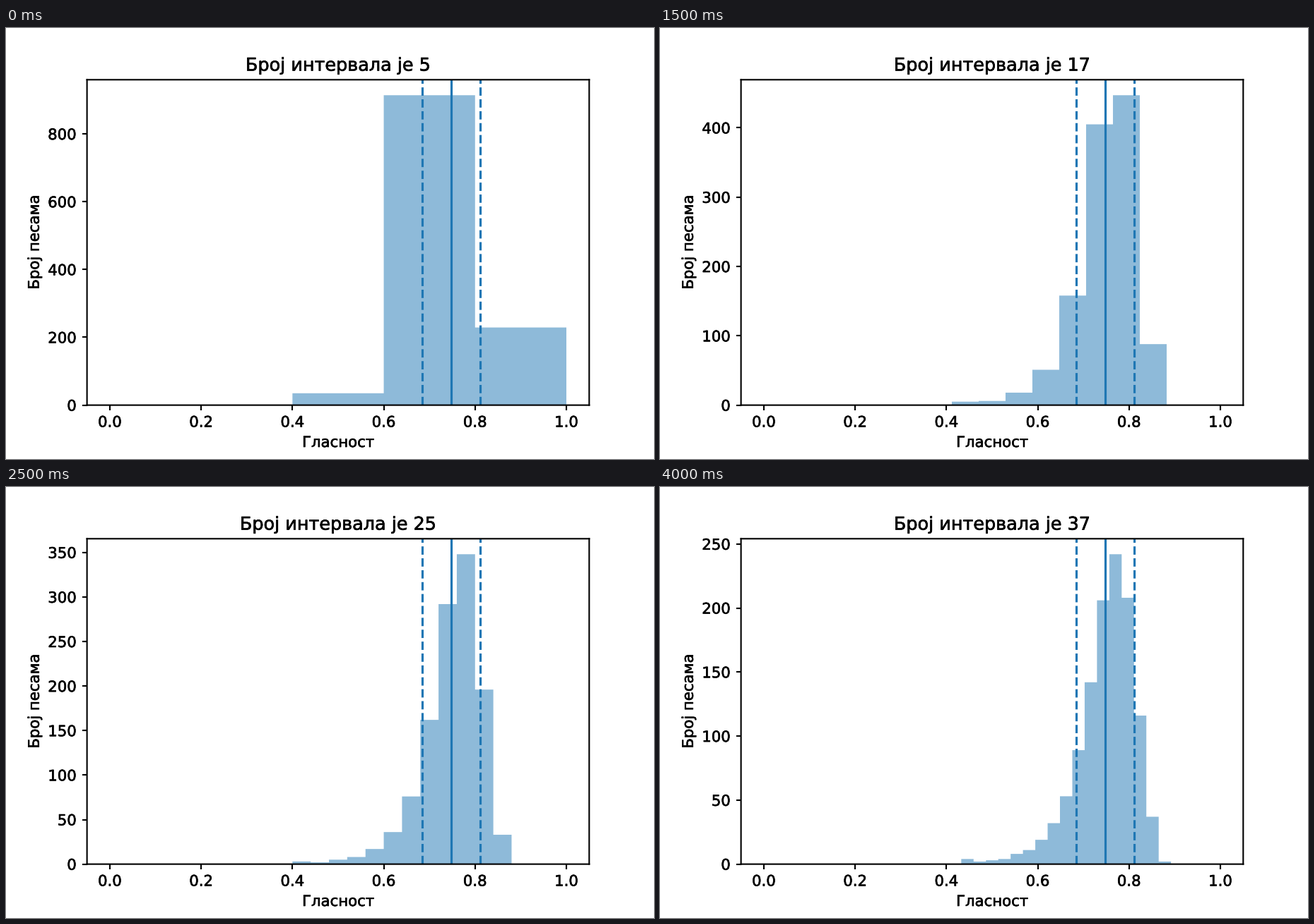
Write a matplotlib script that moves like this. It is 917 by 611 pixels and loops after 4500 ms.

```python
import numpy as np
import matplotlib.pyplot as plt
from matplotlib.animation import FuncAnimation
from matplotlib.patheffects import withStroke

WIDTH, HEIGHT, DPI = 917, 611, 152.8
SONGS = 1178
MEAN, STD = 0.7485, 0.0635
QUIETEST, LOUDEST = 0.44, 0.8809
MEDIAN = 0.7586
BIN_COUNTS = range(5, 38, 4)

plt.rcParams.update({
    "font.family": "DejaVu Sans",
    "path.snap": False,
    "axes.linewidth": 1.0,
    "xtick.major.width": 1.0,
    "ytick.major.width": 1.0,
})


def songs_below(x):
    """Left-skewed distribution: log-odds rise steeply near the loudest song."""
    gap = np.maximum(LOUDEST - x, 1e-6)
    log_odds = 8.2 * (x - MEDIAN) + 2.62 * np.log((LOUDEST - MEDIAN) / gap)
    share = 1 / (1 + np.exp(-log_odds))
    return np.round(SONGS * np.where(x < QUIETEST, 0, share))


fig = plt.figure(figsize=((WIDTH + 1e-4) / DPI, (HEIGHT + 1e-4) / DPI), dpi=DPI)
ax = fig.add_axes([0.125, 0.125, 0.775, 0.755])


def draw(i):
    n = BIN_COUNTS[i]
    edges = np.arange(n + 1) / n
    ax.clear()
    ax.hist(edges[:-1], bins=edges, weights=np.diff(songs_below(edges)),
            histtype="stepfilled", color="C0", alpha=0.5)
    ax.axvline(MEAN, color="C0")
    for x in (MEAN - STD, MEAN + STD):
        ax.axvline(x, color="C0", linestyle="--")
    texts = [
        ax.set_title(f"Број интервала је {n}"),
        ax.set_xlabel("Гласност"),
        ax.set_ylabel("Број песама"),
        *ax.get_xticklabels(),
        *ax.get_yticklabels(),
    ]
    for text in texts:
        text.set_path_effects([withStroke(linewidth=0.3, foreground="black")])
    return []


anim = FuncAnimation(fig, draw, frames=len(BIN_COUNTS), interval=500,
                     init_func=lambda: draw(0), repeat=True, repeat_delay=0)
plt.show()
```
